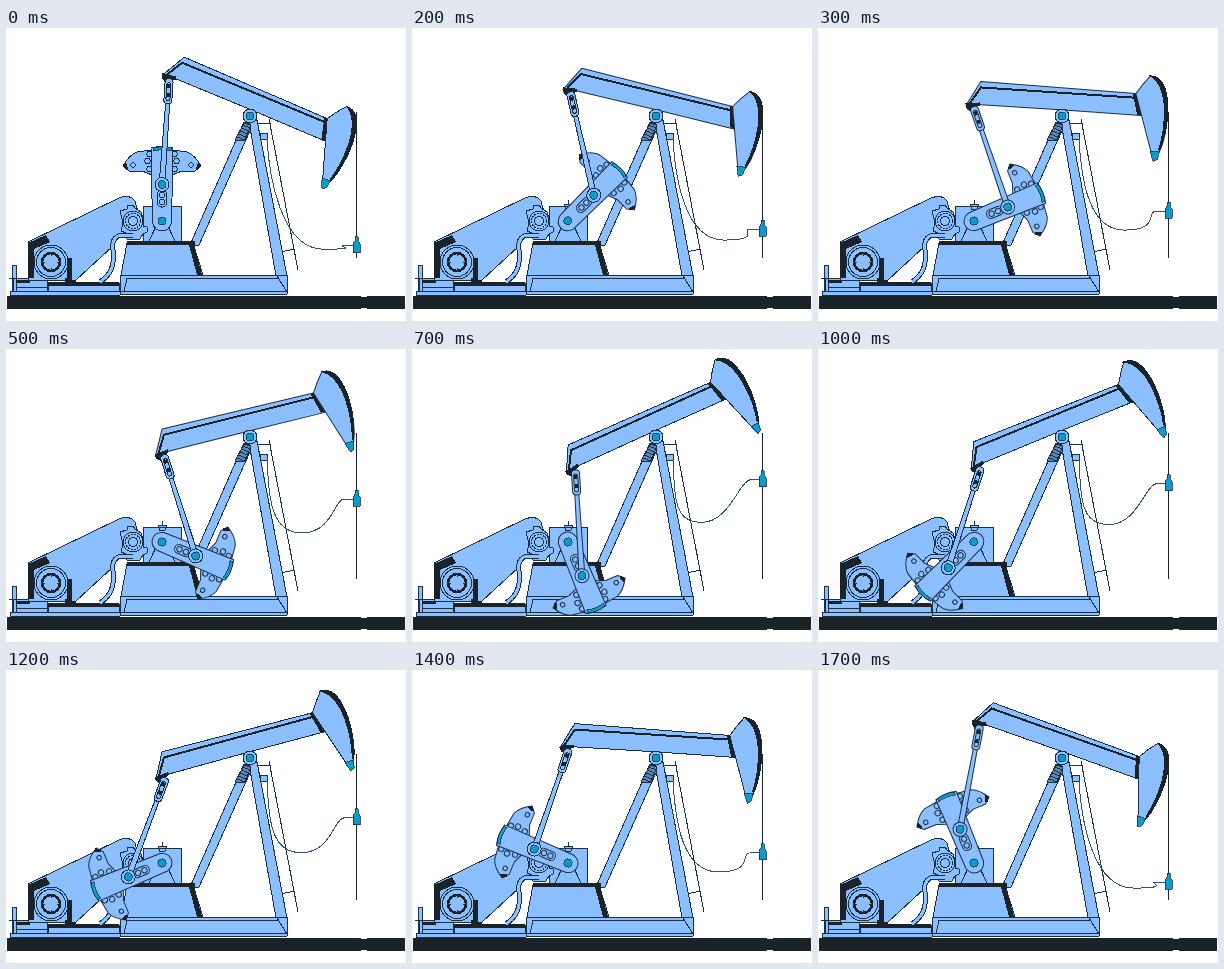
Recreate the animation shown at these times as an HTML page. Size 400 by 293 pixels, loop 1.85 s.

```html
<!DOCTYPE html>
<html lang="en">
<head>
<meta charset="utf-8">
<title>Pump jack</title>
<style>
  html, body { margin: 0; width: 100%; height: 100%; overflow: hidden; background: #fff; }
  svg { display: block; width: 100vw; height: 100vh; shape-rendering: crispEdges; }
  .b { fill: #8cbfff; stroke: #1b3045; stroke-width: 1; stroke-linejoin: round; }
  .l { fill: none; stroke: #1b3045; stroke-width: 1; }
  .k { fill: #1b2329; }
  .t { fill: #0a9ccc; stroke: #1b3045; stroke-width: .8; }
</style>
</head>
<body>
<svg viewBox="0 0 400 293">
  <!-- ground and skid -->
  <path class="k" d="M1 268H355V269H361V268H399V281H361V280H355V281H1Z"/>
  <path class="b" d="M4 263H114V267H4ZM6 237H10V263H6ZM7 250H41V263H7Z"/>
  <path class="l" d="M10 259H42M3 250H12"/>
  <path class="b" d="M42 255H113V263H42Z"/>
  <path class="k" d="M42 254H113V258H42ZM10 252H24V255H10Z"/>

  <!-- engine and belt guard -->
  <path class="b" d="M22 214L113 170Q124 166 129 173L131 180L134 204L110 210L107 218L70 252H22Z"/>
  <path class="k" d="M22 215L40 207L44 214L28 221V250H22ZM61 230H66V252H70V255H59V250H61Z"/>
  <circle class="b" cx="45" cy="234" r="17"/>
  <circle class="l" cx="45" cy="234" r="14.5"/>
  <circle cx="45" cy="234" r="9" fill="#8cbfff" stroke="#1b2329" stroke-width="2.5"/>
  <path class="l" d="M45 224V228M45 240V244M35 234H39M51 234H55"/>

  <!-- gearbox and pedestal -->
  <path class="b" d="M137 178H175V214H137ZM153 178H159V181H153Z"/>
  <path class="b" d="M152 176H160V178H152Z"/>
  <path class="l" d="M156.500 172V176"/>
  <path class="b" d="M143 213L152 194H160L169 213Z"/>
  <path class="b" d="M114 183L121 181L122 177H127L129 180L135 184L137 190V198L141 199V204L137 206L134 211H121L120 205L115 203L117 195Z"/>
  <path d="M127 207L112 208Q105 212 107 222V234Q106 246 94 254" fill="none" stroke="#1b3045" stroke-width="5"/>
  <path d="M127 207L112 208Q105 212 107 222V234Q106 246 94 254" fill="none" stroke="#8cbfff" stroke-width="3"/>
  <circle class="b" cx="127" cy="193" r="10"/>
  <circle class="b" cx="127" cy="193" r="7.500" stroke-dasharray="2 1"/>
  <circle class="b" cx="127" cy="193" r="4.500"/>

  <!-- legs and ladder -->
  <path class="l" d="M263 91L292 242M252 95H265M275 224L288 221"/>
  <path class="l" d="M266 107L288 221" stroke-dasharray="1 3"/>
  <path class="b" d="M238 94L247 96L193 217H184Z"/>
  <path class="b" d="M243 94L251 92L281 248H270Z"/>
  <path class="b" d="M229 112L238 95L245 97L239 112Z" style="fill:#5f86ba"/>
  <path class="l" d="M231 109L239 112M232 106L240 109M234 103L242 106M235 100L243 103M237 97L244 100"/>
  <path class="b" d="M254 105H261V111H254Z" stroke-width=".6"/>

  <!-- base -->
  <path class="b" d="M121 215H187L197 247H115Z"/>
  <path class="k" d="M121 213H189V217H121ZM183 217H188L196 247H191Z"/>
  <path class="b" d="M114 247H281V266H114Z"/>
  <path class="l" d="M118 264L121 250H271V248L281 264M114 263H281"/>

  <!-- well line -->
  <path id="cable" class="l" style="stroke:#30527a"/>
  <path d="M350.500 84V230" stroke="#1b2329"/>
  <g id="carrier">
    <path class="t" d="M349 -9H352V-5L354 -2V7H347V-2L349 -5Z"/>
  </g>

  <!-- walking beam, drawn at its rest tilt -->
  <g id="beam">
    <path class="b" d="M163 53L318 66L323 88L246 82L159 76L150 81L148 77Z"/>
    <path d="M152 75L163 59L316 70" fill="none" stroke="#1b2329" stroke-width="2"/>
    <path class="k" d="M147.500 75L162 74V77L156 79L152 83L148 79ZM315 66H319L324 88L319 87Z"/>
    <path class="b" d="M333 48Q325 56 318 66L333 125H341Q349 109 349 82Q347 55 333 48Z"/>
    <path class="k" d="M331 48Q350 46 350.500 82Q350 106 341 125L340 122Q346 104 346 82Q345 55 331 48Z"/>
    <path class="t" d="M332 124H341L339 132L335 134Z"/>
  </g>
  <circle class="b" cx="244" cy="88" r="7"/>
  <circle class="t" cx="244" cy="88" r="4"/>

  <!-- crank with counterweights, pointing up -->
  <g id="crank">
    <g id="weight">
      <path class="b" d="M-10 -71L-25 -69Q-33 -66 -39 -55L-33 -50L-20 -50L-10 -46Z"/>
      <path class="k" d="M-39 -56L-36 -59L-34 -52L-36 -51Z"/>
      <circle class="b" cx="-29" cy="-56" r="2.200"/>
      <g class="b">
        <circle cx="-12.500" cy="-67" r="2.700"/>
        <circle cx="-14.500" cy="-60" r="2.700"/>
        <circle cx="-12.500" cy="-52" r="2.700"/>
      </g>
    </g>
    <use href="#weight" transform="scale(-1 1)"/>
    <path class="b" d="M-11 -73Q0 -76 11 -73L9.500 2Q7 10 0 10T-9.500 2Z"/>
    <path class="t" d="M-9 -73Q0 -76 9 -73V-70Q0 -73 -9 -70Z"/>
    <rect class="b" x="-4.500" y="-31" width="9" height="17" rx="4"/>
    <circle class="b" cy="-26" r="2.700"/>
    <circle class="b" cy="-19" r="2.700"/>
    <circle class="t" r="4"/>
  </g>

  <!-- connecting rod, from crank pin upwards -->
  <g id="rod">
    <path class="b" d="M-2.800 -6L-2 -83H2L2.800 -6Z"/>
    <rect class="b" x="-4" y="-106" width="8" height="25" rx="3.500"/>
    <rect class="b" x="-2" y="-102" width="4" height="18" rx="2"/>
    <path d="M0 -101V-97M0 -92V-88" stroke="#1b2329" stroke-width="3"/>
    <circle class="b" r="7"/>
    <circle class="t" r="4"/>
  </g>
</svg>
<script>
  const LOOP = 1850, DEG = Math.PI / 180;
  const HUB = { x: 156, y: 193 }, PIVOT = { x: 244, y: 88 };
  const CRANK = 36.5, ROD = 103.5, TAIL = 88, HEAD = 106, REST_TILT = 4.8;
  const set = (id, name, value) => document.getElementById(id).setAttribute(name, value);

  // The last poses hold longer; the lower left of the turn has one half step.
  function crankAngle(ms) {
    const step = ms < 1400 ? Math.floor(ms / 100) : 14 + Math.floor((ms - 1400) / 150);
    if (step === 11) return 236.25;
    return 22.5 * (step < 11 ? step : step - 1);
  }

  // Beam tilt from the triangle of pivot, crank pin and tail pin.
  function beamTilt(pin) {
    const dx = pin.x - PIVOT.x, dy = pin.y - PIVOT.y, d = Math.hypot(dx, dy);
    const corner = Math.acos((TAIL ** 2 + d ** 2 - ROD ** 2) / (2 * TAIL * d));
    return Math.atan2(dy, dx) + corner - Math.PI;
  }

  function draw(ms) {
    const angle = crankAngle(ms);
    const pin = {
      x: HUB.x + CRANK * Math.sin(angle * DEG),
      y: HUB.y - CRANK * Math.cos(angle * DEG)
    };
    const tilt = beamTilt(pin);
    const tail = { x: PIVOT.x - TAIL * Math.cos(tilt), y: PIVOT.y - TAIL * Math.sin(tilt) };
    const lean = Math.atan2(tail.x - pin.x, pin.y - tail.y) / DEG;
    const y = 174.8 + HEAD * tilt;
    const lowX = 290 + (y - 132) * .32, lowY = 174 + (y - 132) * .55;

    set('crank', 'transform', `translate(${HUB.x} ${HUB.y}) rotate(${angle})`);
    set('rod', 'transform', `translate(${pin.x} ${pin.y}) rotate(${lean})`);
    set('beam', 'transform', `rotate(${tilt / DEG - REST_TILT} ${PIVOT.x} ${PIVOT.y})`);
    set('carrier', 'transform', `translate(0 ${y})`);
    set('cable', 'd', `M261 110C263 150 ${117 + lowX / 2} ${lowY} ${lowX} ${lowY}` +
      `S328 ${y} 338 ${y}H348`);
  }

  function tick() {
    draw(performance.now() % LOOP);
    requestAnimationFrame(tick);
  }
  tick();
</script>
</body>
</html>
```
